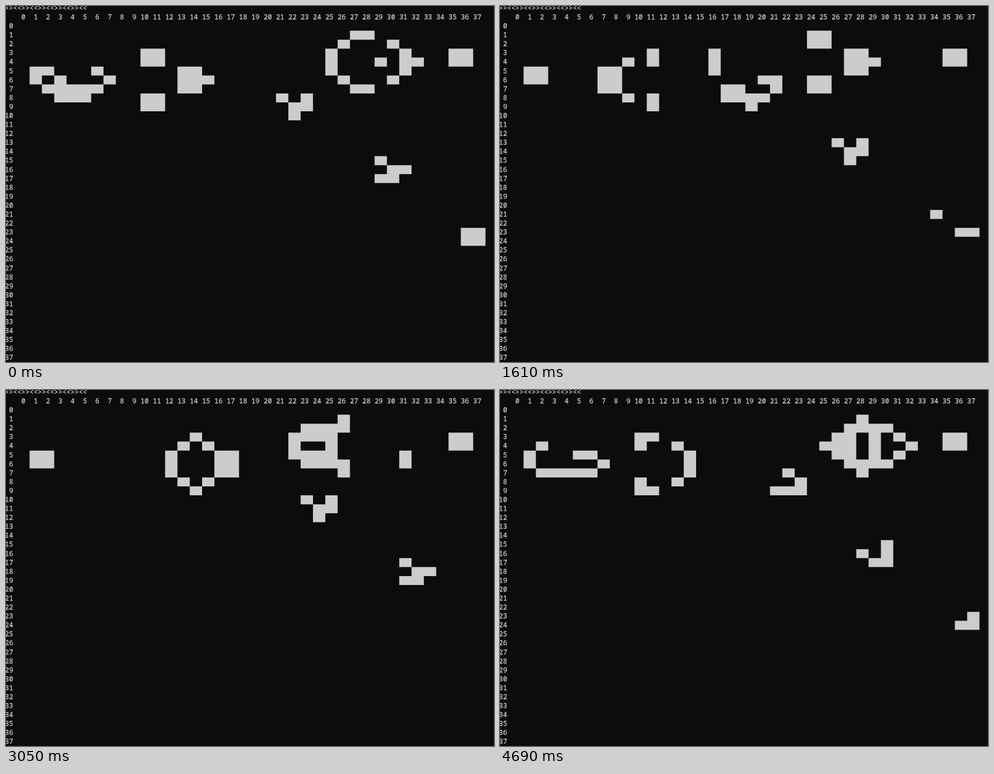
These frames come from a looping animation (876 px wide and 639 px high, 4760 ms). An HTML page with a canvas:

```html
<!DOCTYPE html>
<html lang="en">
<head>
<meta charset="utf-8">
<title>Glider gun in a console</title>
<style>
  html, body { margin: 0; width: 100%; height: 100%; overflow: hidden; background: #0c0c0c; }
  canvas { display: block; }
</style>
</head>
<body>
<canvas id="stage" width="876" height="639"></canvas>
<script>
const SIZE = 38, LOOP = 4760, GENERATIONS = 60, WARM_UP = 80;
const CHAR = 7.373, CELL = CHAR * 3, LINE = 16.09;
const LEFT = 20.2, TOP = 28.2;

const makeGrid = alive => Array.from({ length: SIZE }, (_, row) =>
  Array.from({ length: SIZE }, (_, col) => alive(row, col)));

// Conway's rule; everything beyond the walls is dead.
function evolve(grid) {
  return makeGrid((row, col) => {
    let near = 0;
    for (let dr = -1; dr <= 1; dr++)
      for (let dc = -1; dc <= 1; dc++)
        if ((dr || dc) && grid[row + dr]?.[col + dc]) near++;
    return near === 3 || (near === 2 && grid[row][col]);
  });
}

// Gosper's gun: two shuttles, each mirrored about an axis row, between two blocks.
function gosperGun() {
  const grid = makeGrid(() => false);
  const block = (row, col) => {
    for (const r of [row, row + 1]) grid[r][col] = grid[r][col + 1] = true;
  };
  const shuttle = (axis, half) => half.forEach((cols, d) => {
    for (const col of cols) grid[axis - d][col] = grid[axis + d][col] = true;
  });
  block(5, 1);
  shuttle(6, [[11, 15, 17, 18], [11, 17], [12, 16], [13, 14]]);
  shuttle(4, [[21, 22], [21, 22], [23, 25], [25]]);
  block(3, 35);
  return grid;
}

// Once the first glider has become a block at the wall, the field repeats.
let first = gosperGun();
for (let i = 0; i < WARM_UP; i++) first = evolve(first);
const cycle = [first];
while (cycle.length < GENERATIONS) cycle.push(evolve(cycle.at(-1)));

// Screen refreshes [ms, tick]; every seventh one shows no new generation.
const pace = [[0, 0], [1610, 24], [2700, 41], [2900, 43], [4758, 70], [LOOP, 70]];

function generationAt(ms) {
  const i = pace.findIndex(([end]) => ms < end);
  const [[t0, tick0], [t1, tick1]] = [pace[i - 1], pace[i]];
  const tick = Math.floor(tick0 + (tick1 - tick0) * (ms - t0) / (t1 - t0));
  return (tick - Math.floor((tick + 4) / 7)) % GENERATIONS;
}

const ctx = document.getElementById("stage").getContext("2d");

function print(text, x, row) {
  const y = TOP + row * LINE + 11.9;
  ctx.fillText(text, x, y);
  ctx.strokeText(text, x, y);
}

function draw(grid) {
  ctx.fillStyle = "#0c0c0c";
  ctx.fillRect(0, 0, 876, 639);
  ctx.fillStyle = ctx.strokeStyle = "#cccccc";
  ctx.lineWidth = 0.3;
  ctx.font = '12.29px "Noto Sans Mono", "DejaVu Sans Mono", monospace';
  print(">><<".repeat(5), LEFT - CELL, -2);
  for (let i = 0; i < SIZE; i++) {
    const indent = i < 10 ? CHAR : 0;
    print(i, LEFT + i * CELL + indent, -1);
    print(i, LEFT - CELL + indent, i);
  }
  ctx.beginPath();
  grid.forEach((cells, row) => cells.forEach((alive, col) => {
    if (alive) ctx.rect(LEFT + col * CELL, TOP + row * LINE, CELL, LINE);
  }));
  ctx.fill();
}

const start = performance.now();
function frame() {
  draw(cycle[generationAt((performance.now() - start) % LOOP)]);
  requestAnimationFrame(frame);
}
frame();
</script>
</body>
</html>
```
